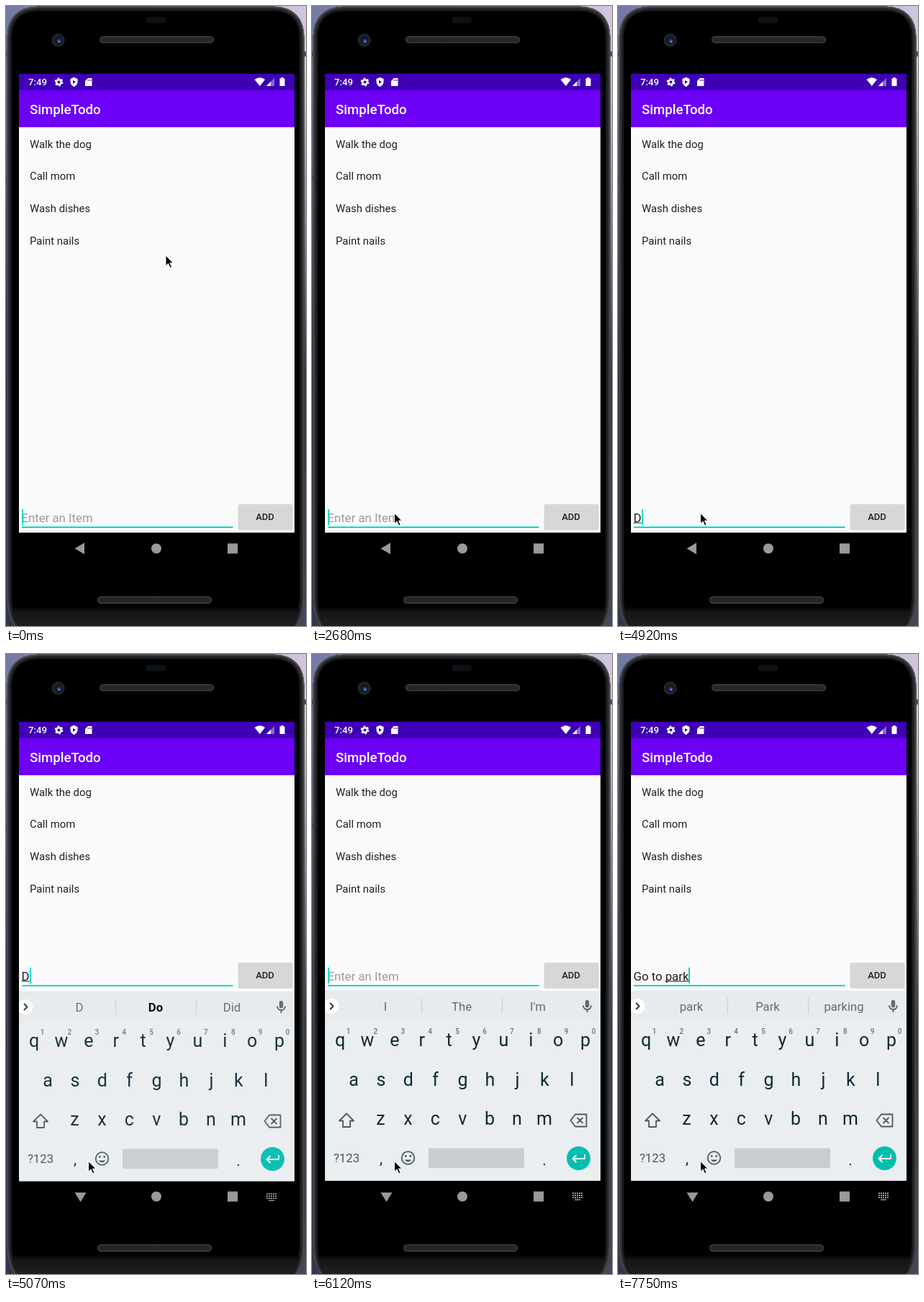
An HTML page that plays this animation: 417 px wide and 860 px high, repeating every 8000 ms.

```html
<!DOCTYPE html>
<html lang="en">
<head>
<meta charset="utf-8">
<title>Todo app</title>
<style>
  html, body { margin: 0; width: 100%; height: 100%; overflow: hidden; background: #000; }
  svg { display: block; width: 100%; height: 100%; }
  text { font-family: Roboto, sans-serif; white-space: pre; }
  .item { font-size: 14.9px; fill: #212121; }
  .field { font-size: 16.77px; fill: #212121; }
  .word { font-size: 16.7px; fill: #5f6b72; text-anchor: middle; }
  .key { font-size: 25px; fill: #0d2a35; text-anchor: middle; }
  .digit { font-size: 10px; fill: #65737a; text-anchor: middle; font-weight: 500; }
  .line { fill: none; stroke: #4b5a62; stroke-width: 1.8; stroke-linejoin: round; }
</style>
</head>
<body>
<svg viewBox="0 0 417 860">
  <defs>
    <linearGradient id="wallpaper">
      <stop offset="0" stop-color="#7279a4"/>
      <stop offset="1" stop-color="#d3c6de"/>
    </linearGradient>
    <linearGradient id="dusk" x2="0" y2="1">
      <stop offset=".1" stop-color="#24263a" stop-opacity="0"/>
      <stop offset=".6" stop-color="#24263a" stop-opacity=".9"/>
      <stop offset="1" stop-color="#24263a" stop-opacity=".8"/>
    </linearGradient>
    <linearGradient id="chin" x2="0" y2="1">
      <stop offset="0" stop-color="#000"/>
      <stop offset=".3" stop-color="#151616"/>
      <stop offset="1" stop-color="#1e2020"/>
    </linearGradient>
    <pattern id="mesh" width="2" height="2" patternUnits="userSpaceOnUse">
      <path d="M0 0h2v2H0z" fill="#2b2d2d"/><path d="M0 0h1v1H0z" fill="#161717"/>
    </pattern>
    <path id="body" d="M1.500 44Q2 2 44 .500H372Q414 2 414.500 44V822Q414 850 400 866H16Q2 850 1.500 822z"/>
    <clipPath id="bodyClip"><use href="#body"/></clipPath>
    <clipPath id="screen"><path d="M18 94H401V760H18z"/></clipPath>
  </defs>

  <!-- Phone body -->
  <path d="M0 0H417V860H0z" fill="url(#wallpaper)"/>
  <path d="M0 0H417V860H0z" fill="url(#dusk)"/>
  <path d="M0 66.500h3M0 238.500h3M413 66.500h4" stroke="#4c4e4f" stroke-width="7"/>
  <g clip-path="url(#bodyClip)">
    <use href="#body" fill="#000"/>
    <path d="M0 833H417V860H0z" fill="url(#chin)"/>
    <use href="#body" fill="none" stroke="#191a1b" stroke-width="13"/>
    <use href="#body" fill="none" stroke="#2b2d2e" stroke-width="8"/>
    <use href="#body" fill="none" stroke="#505253" stroke-width="3"/>
  </g>
  <rect x="195" y="15" width="27" height="9" rx="3" fill="#0b1115"/>
  <g fill="url(#mesh)" stroke="#4a4d4d">
    <rect x="130.5" y="42.5" width="158" height="8.5" rx="4"/>
    <rect x="127.5" y="819.5" width="158" height="9" rx="4"/>
  </g>
  <circle cx="72.5" cy="47.5" r="8.5" fill="#1d2021" stroke="#343738"/>
  <circle cx="73" cy="47.5" r="5" fill="#101831"/>
  <circle cx="73.5" cy="48.5" r="2.6" fill="#2c4492"/>
  <circle cx="74" cy="49.5" r="1" fill="#9cb6ee"/>

  <!-- App -->
  <path d="M18 94H401V730.500H18z" fill="#fafafa"/>
  <path d="M18 116H401V168H18z" fill="#6b00f5"/>
  <path d="M18 94H401V116.500H18z" fill="#3f00b5"/>
  <path d="M18 168.500H401" stroke="#dcd6e6"/>
  <g fill="#fff">
    <text x="31" y="110" font-size="13.2" font-weight="500">7:49</text>
    <circle cx="73.500" cy="105.500" r="3.300" fill="none" stroke="#fff" stroke-width="2.600"/>
    <circle cx="73.500" cy="105.500" r="5" fill="none" stroke="#fff" stroke-width="1.800" stroke-dasharray="2.618"/>
    <path d="M94.500 99l5 2v4q0 4.500-5 7-5-2.500-5-7v-4z"/>
    <path d="M93 102.700l4 2.600-4 2.600z" fill="#3f00b5"/>
    <path d="M114 100h5.500v11H110v-7z"/>
    <path d="M114 102v2M116 102v2M118 102v2" stroke="#3f00b5" stroke-width=".900"/>
    <path d="M345.500 102q7.300-5.500 14.500 0l-7.200 9z"/>
    <path d="M362 111l11-11v11z" opacity=".4"/><path d="M362 111l6-6v6z"/>
    <path d="M380.500 100.500h2v-1.500h3v1.500h2V111h-7z"/>
    <text x="33" y="150" font-size="18.64" font-weight="500">SimpleTodo</text>
  </g>
  <g id="items"></g>

  <g id="entry">
    <text id="hint" class="field" x="21.5" y="715.5" style="fill:#9b9b9b">Enter an Item</text>
    <text id="typed" class="field" x="21.5" y="715.5"></text>
    <rect id="composing" y="716.500" height="1" fill="#212121"/>
    <path d="M22 723H315.500" stroke="#03dac5" stroke-width="2"/>
    <rect id="caret" y="698" width="2" height="22" fill="#03dac5"/>
    <rect x="322.5" y="692" width="76" height="35" rx="2" fill="#000" opacity=".14"/>
    <rect x="323" y="691" width="75" height="34.500" rx="2" fill="#d6d7d7"/>
    <text x="360" y="713" font-size="13.05" font-weight="500" fill="#212121" text-anchor="middle">ADD</text>
  </g>

  <!-- Navigation -->
  <g fill="#999">
    <path id="back"/>
    <circle cx="209" cy="752.500" r="7"/>
    <path d="M308 745.500h14v14h-14z"/>
  </g>

  <g id="keyboard" clip-path="url(#screen)">
    <path d="M18 467H401V730.500H18z" fill="#eaeef1"/>
    <path d="M18 467H401V509H18z" fill="#e7ebee"/>
    <path d="M152.500 477V499M264.500 477V499" stroke="#c5cbcf"/>
    <circle cx="27" cy="488.500" r="10.500" fill="#fff"/>
    <path d="M25 484l4.500 4.500-4.500 4.500" class="line" style="stroke:#26343b"/>
    <g id="words"></g>
    <rect x="379.800" y="480" width="5.400" height="10.500" rx="2.700" fill="#5f6b72"/>
    <path d="M377 487.500q.500 5.500 5.500 5.500t5.500-5.500M382.500 493v4" class="line"/>
    <g id="keys"></g>
    <path d="M48 637.500l10 10h-5V656H43v-8.500h-5z" class="line"/>
    <path d="M366 638.500h15.500v17H366l-6.500-8.500zM368.500 643l8 8M376.500 643l-8 8" class="line"/>
    <text x="48" y="705" font-size="16.7" fill="#44545c" text-anchor="middle">?123</text>
    <text x="96" y="707" class="key" style="font-size:21px">,</text>
    <text x="323" y="708.5" class="key" style="font-size:21px">.</text>
    <circle cx="133.500" cy="699" r="8.800" class="line"/>
    <path d="M128.500 701.500q5 5.500 10 0z" fill="#4b5a62"/>
    <circle cx="130.300" cy="696.500" r="1.400" fill="#4b5a62"/>
    <circle cx="136.700" cy="696.500" r="1.400" fill="#4b5a62"/>
    <rect x="162" y="685.500" width="133" height="27.500" rx="2" fill="#c9cdd2"/>
    <circle cx="370.500" cy="699.500" r="16.500" fill="#00bfae"/>
    <path d="M379 694v6H363M367.500 695l-5 5 5 5" class="line" style="stroke:#fff"/>
    <path d="M362 748h14M362 751h14M362 754h14" stroke="#999" stroke-width="1.800" stroke-dasharray="2 1"/>
    <path d="M365 757h8" stroke="#999" stroke-width="1.500"/>
  </g>

  <path id="pointer" d="M.500 0V14.500L4 11.300L6.600 17.200L9 16.200L6.500 10.500H10.800z" fill="#000" stroke="#fff" stroke-width="1" stroke-linejoin="round"/>
</svg>
<script>
const LOOP = 8000;
const FIELD_X = 21.5;
const $ = id => document.getElementById(id);

function addText(parent, x, y, text, className) {
  const node = document.createElementNS("http://www.w3.org/2000/svg", "text");
  node.setAttribute("x", x);
  node.setAttribute("y", y);
  node.setAttribute("class", className);
  node.textContent = text;
  $(parent).append(node);
  return node;
}

["Walk the dog", "Call mom", "Wash dishes", "Paint nails"].forEach((text, i) =>
  addText("items", 33, 196.5 + 44.7 * i, text, "item"));

[["qwertyuiop", 39, 544], ["asdfghjkl", 58, 598.5], ["zxcvbnm", 95.5, 653]].forEach(([row, x, y]) =>
  [...row].forEach((letter, i) => addText("keys", x + 37.9 * i, y, letter, "key")));
[..."1234567890"].forEach((digit, i) => addText("keys", 50.5 + 37.9 * i, 526.5, digit, "digit"));

const words = [102, 208, 314].map(x => addText("words", x, 494.5, "", "word"));

// Pointer tip: [start time, x, y]
const pointerSteps = [
  [0, 221.5, 346], [150, 213, 379], [300, 172, 521], [440, 127, 681], [590, 113, 719], [740, 114, 703.5]
];

// Typing: [start time, text, index where the underlined word begins, suggestions]
const typing = [
  [0, "", 0, ""],
  [4920, "D", 0, "D Do Did"],
  [5220, "Do", 0, "Do Don't Does"],
  [5970, "D", 0, "D Do Did"],
  [6120, "", 0, "I The I'm"],
  [6560, "Go", 0, "Go Good Gone"],
  [7010, "Go ", 3, "for to back"],
  [7160, "Go t", 3, "the to this"],
  [7310, "Go to", 3, "to too tomorrow"],
  [7460, "Go to ", 6, "the bed sleep"],
  [7600, "Go to pa", 6, "pa pay party"],
  [7750, "Go to park", 6, "park Park parking"]
];

const caretToggles = [150, 740, 1180, 1630, 2080, 2680, 3130, 3580, 4180, 4630, 5820, 5970];

const ruler = document.createElement("canvas").getContext("2d");
function textWidth(text) {
  ruler.font = "16.77px Roboto, sans-serif";
  return ruler.measureText(text).width;
}

const latest = (steps, t) => steps.filter(step => step[0] <= t).pop();
const show = (id, visible) => $(id).setAttribute("visibility", visible ? "visible" : "hidden");

function render(t) {
  const [, x, y] = latest(pointerSteps, t);
  $("pointer").setAttribute("transform", `translate(${x} ${y})`);

  const [, text, wordStart, suggestions] = latest(typing, t);
  const end = textWidth(text);
  const start = textWidth(text.slice(0, wordStart));
  $("typed").textContent = text;
  $("composing").setAttribute("x", FIELD_X + start);
  $("composing").setAttribute("width", Math.max(0, end - start));
  $("caret").setAttribute("x", Math.round(FIELD_X + end));
  show("hint", !text);
  show("caret", caretToggles.filter(time => time <= t).length % 2 === 0);

  const open = t >= 5070;
  const settling = open && t < 5220;
  show("keyboard", open);
  $("keyboard").setAttribute("transform", `translate(0 ${settling ? 1 : 0})`);
  $("keyboard").setAttribute("opacity", settling ? 0.95 : 1);
  $("entry").setAttribute("transform", `translate(0 ${open ? -263 : 0})`);
  $("back").setAttribute("d", open ? "M95.5 747H111.5L103.5 760z" : "M95.5 752.5L109 744.5V760.5z");

  const list = suggestions.split(" ");
  words.forEach((node, i) => {
    const bold = text === "D" && i === 1;
    node.textContent = list[i] || "";
    node.style.fontWeight = bold ? 700 : 400;
    node.style.fill = bold ? "#000" : "";
  });
}

function tick() {
  render(performance.now() % LOOP);
  requestAnimationFrame(tick);
}
tick();
</script>
</body>
</html>
```
